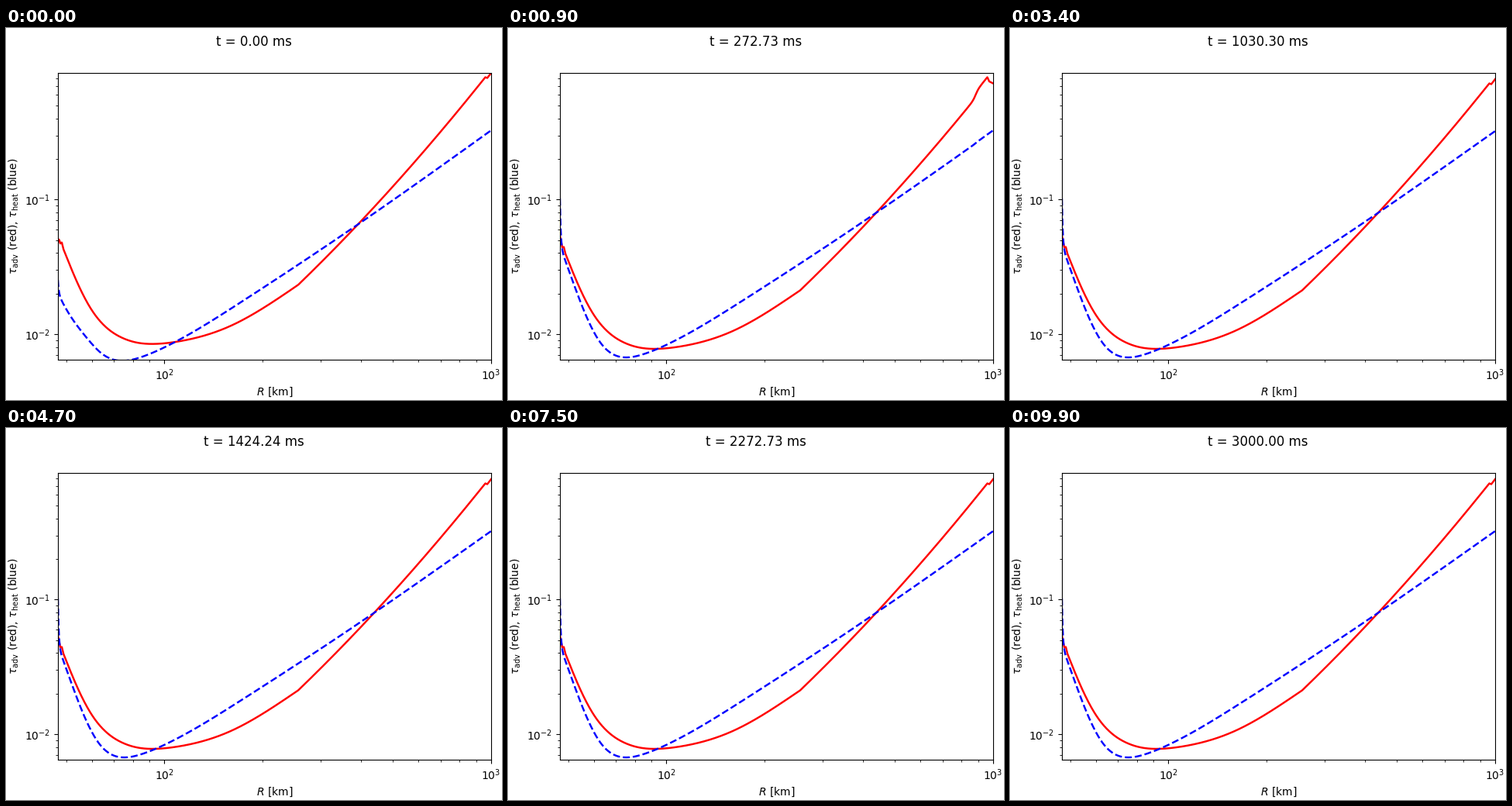
Recreate the animation shown at these times as a matplotlib script. Size 640 by 480 pixels, loop 10 s.

```python
import numpy as np
import matplotlib.pyplot as plt
from matplotlib.animation import FuncAnimation

W, H, DPI = 640, 480, 100
FRAMES, T_END = 100, 3000.0
LEFT, RIGHT, TOP, BOTTOM = 67.0, 626.0, 58.0, 428.3
X_DECADE, Y_DECADE, Y_TENTH = 421.5, 173.5, 221.3
KINK, EDGE = 377, 618.5


def radius(px):
    return 10 ** (3 + (px - RIGHT) / X_DECADE)


def tau(py):
    return 10 ** (-1 + (Y_TENTH - py) / Y_DECADE)


def spline(pts, x):
    """Natural cubic spline through pts."""
    px, py = np.array(pts, float).T
    h = np.diff(px)
    n = len(px)
    a, b = np.eye(n), np.zeros(n)
    for i in range(1, n - 1):
        a[i, i - 1:i + 2] = h[i - 1], 2 * (h[i - 1] + h[i]), h[i]
        b[i] = 6 * ((py[i + 1] - py[i]) / h[i] - (py[i] - py[i - 1]) / h[i - 1])
    m = np.linalg.solve(a, b)
    k = np.clip(np.searchsorted(px, x) - 1, 0, n - 2)
    u, v, hk = px[k + 1] - x, x - px[k], h[k]
    return ((m[k] * u**3 + m[k + 1] * v**3) / (6 * hk)
            + (py[k] / hk - m[k] * hk / 6) * u
            + (py[k + 1] / hk - m[k + 1] * hk / 6) * v)


def sigmoid(z):
    return 1 / (1 + np.exp(-np.clip(z, -50, 50)))


xs = np.append(np.arange(LEFT, RIGHT, 0.25), RIGHT)
wall = np.exp(-(xs - LEFT) / 1.1)  # thin layer at the inner edge

# Advection time: inner notch, basin, steepening rise, outer notch
notch = np.interp(xs, [LEFT, 70, 72, 74], [268, 283, 282.5, 291])
basin = spline([(74, 291), (90, 330), (110, 369), (130, 393), (150, 406),
                (170, 412.4), (190, 414), (220, 411.3), (290, 391),
                (KINK, 338.5)], xs)
d = xs - KINK
rise = 338.5 - 0.962 * d - 0.000596 * d**2
rim = np.interp(xs, [EDGE, 621, RIGHT], [71.5, 72.5, 66])
red_end = np.select([xs < 74, xs < KINK, xs < EDGE], [notch, basin, rise], rim)
red_start = red_end - 6 - (xs - 100) / 260 + 14 * wall

# Heating time: smooth valley, with a spike at the inner edge
valley = spline([(LEFT, 281), (80, 317), (100, 369.5), (120, 407),
                 (140, 423), (155, 425), (175, 420.8), (204, 409),
                 (300, 353.5), (475, 238.5), (RIGHT, 133)], xs)
blue_end = valley - 61 * wall
blue_start = (valley + 66 * sigmoid((90 - xs) / 13)
              + 4 - (xs - 130) / 100 - 17 * wall)


def state(i):
    """Both curves while the relaxation front runs outwards."""
    if i == 0:
        return red_start, blue_start
    front = RIGHT + X_DECADE * np.log10((47 + 93 * i) / 1000)
    ahead = sigmoid((xs - front) / 1.8)
    red = red_end + (red_start - red_end) * ahead
    blue = blue_end + (blue_start - blue_end) * ahead
    # outer boundary sags until the front has left
    sag = 13.5 * np.exp(-max(i - 10, 0) / 2.5)
    red = red + sag * np.clip((xs - EDGE) / (RIGHT - EDGE), 0, 1)
    return red, blue


fig = plt.figure(figsize=(W / DPI, H / DPI), dpi=DPI)
ax = fig.add_axes([LEFT / W, 1 - BOTTOM / H,
                   (RIGHT - LEFT) / W, (BOTTOM - TOP) / H])
ax.set_xscale("log")
ax.set_yscale("log")
ax.set_xlim(radius(LEFT), radius(RIGHT))
ax.set_ylim(tau(BOTTOM), tau(TOP))
ax.set_xlabel(r"$R$ [km]")
ax.set_ylabel(r"$\tau_{\rm adv}$ (red), $\tau_{\rm heat}$ (blue)")
title = fig.suptitle("", y=0.982)
red_line, = ax.plot([], [], "r-", lw=1.75)
blue_line, = ax.plot([], [], "b--", lw=1.75)


def update(i):
    red, blue = state(i)
    red_line.set_data(radius(xs), tau(red))
    blue_line.set_data(radius(xs), tau(blue))
    title.set_text(f"t = {T_END * i / (FRAMES - 1):.2f} ms")
    return red_line, blue_line, title


anim = FuncAnimation(fig, update, frames=FRAMES, interval=100,
                     repeat=True, repeat_delay=0)
plt.show()
```
